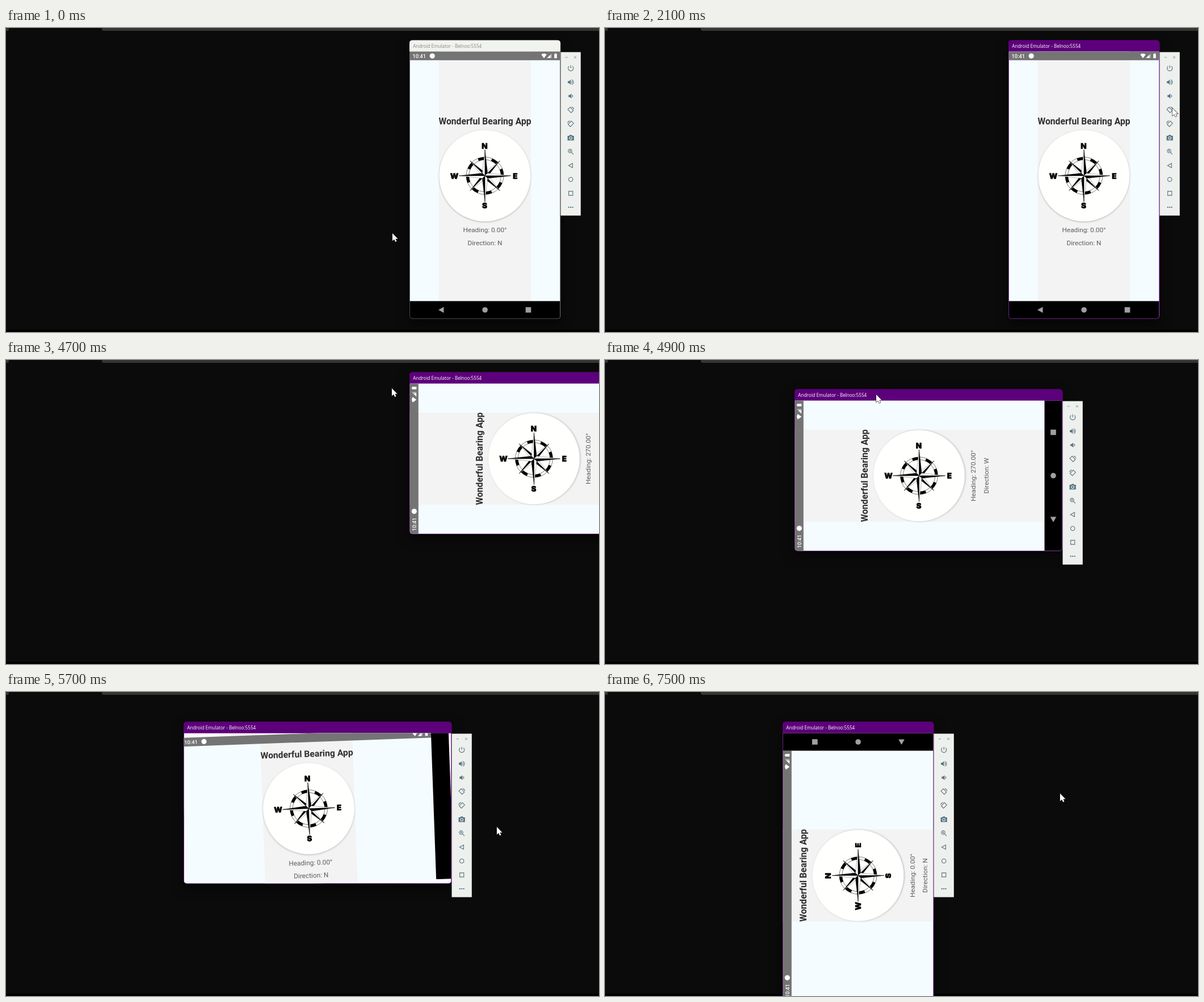
An HTML page for the animation above (8000 ms loop, 1045 by 536 pixels).

```html
<!DOCTYPE html>
<html lang="en">
<head>
<meta charset="utf-8">
<title>Compass in an emulator</title>
<style>
  html, body { margin: 0; width: 100%; height: 100%; overflow: hidden; background: #0b0b0b; }
  svg { display: block; }
  #app, #tall, #wide { font-family: Roboto, sans-serif; }
  #title { font: 8.1px "Open Sans", "Noto Sans", sans-serif; }
  .name { font-size: 15.7px; font-weight: 700; fill: #2f2f2f; text-anchor: middle; }
  .info { font-size: 11.8px; fill: #5c5c5c; text-anchor: middle; }
  .clock { font-size: 9.3px; font-weight: 500; fill: #fff; }
  .letters { font: 900 13.5px Inter, "Open Sans", sans-serif; text-anchor: middle; stroke: #000; stroke-width: .5; }
  .disc { filter: drop-shadow(0 1.5px 1.5px #0004); }
  #frame { filter: drop-shadow(0 8px 10px #0009); }
  #cursor { paint-order: stroke; }
  .line { fill: none; stroke: #557482; stroke-width: 1.1; }
  .solid { fill: #557482; }
</style>
</head>
<body>
<svg id="stage" width="1045" height="536" viewBox="0 0 1045 536">
  <rect width="1045" height="536" fill="#0b0b0b"/>
  <path d="M0 0H5V3Q5 5 3 5H0ZM169 0H1045V5H172Q169 5 169 2Z" fill="#343633"/>
  <rect y="532" width="1045" height="4" fill="#030102"/>
  <g id="win">
    <rect id="frame" x="-.5" rx="5.5"/>
    <path id="bar"/>
    <text id="title" x="5.8" y="13.2">Android Emulator - Belnoo:5554</text>
    <svg id="app" y="20">
      <clipPath id="round"><rect id="hole" y="-20" rx="5"/></clipPath>
      <g clip-path="url(#round)">
        <rect width="471" height="471" fill="#fefdfe"/>
        <g id="tall"></g>
        <g id="wide"></g>
      </g>
    </svg>
    <g id="tools"></g>
  </g>
  <path id="cursor" d="M0 0V13.3L3.1 10.6 5.2 15 7.4 14 5.4 9.7H9.4Z" fill="#fff" stroke="#222" stroke-width="1.2"/>
</svg>
<script>
const $ = id => document.getElementById(id);
const set = (id, attrs) => { for (const k in attrs) $(id).setAttribute(k, attrs[k]); };
const spin = (step, part) => [0, 1, 2, 3].map(i => `<g transform="rotate(${step + i * 90})">${part}</g>`).join('');

// One spike of the rose, half black and half white
const spike = (len, w) =>
  `<path d="M0 0L${-w} ${-w} 0 ${-len}Z" fill="#fff" stroke="#444" stroke-width=".4"/><path d="M0 0L${w} ${-w} 0 ${-len}Z" stroke="#000" stroke-width=".4"/>`;

const rose = `
  <circle r="33" fill="none" stroke="#222" stroke-width=".6"/>
  <circle r="28.3" fill="none" stroke="#222" stroke-width=".6"/>
  <circle r="30.6" fill="none" stroke="#000" stroke-width="5" pathLength="16" stroke-dasharray="1 1" stroke-dashoffset="1"/>
  ${spin(45, spike(37, 4))}${spin(0, spike(46, 4.6))}
  <g class="letters"><text x="-.5" y="-48">N</text><text x="-.5" y="57.5">S</text>
  <text x="-54" y="5">W</text><text x="53.5" y="5">E</text></g>`;

// A phone screen: page of w by h, dial centre at height cy, navigation bar outside the page
function screen(w, h, cy, nav, spots) {
  const cx = w / 2, [back, home, recent] = spots;
  return `<rect width="${w}" height="${h}" fill="#f4fcff"/>
    <rect x="${cx - 81.3}" width="162.6" height="${h}" fill="#f3f3f3"/>
    <rect width="${w}" height="15.3" fill="#747474"/>
    <text class="clock" x="5" y="11.3">10:41</text>
    <g fill="#fff"><circle cx="39.7" cy="7.8" r="4.6"/>
      <g transform="translate(${w},.3)">
        <path d="M-33.3 5Q-28.5 1.6-23.7 5L-28.5 11.5Z"/>
        <path d="M-23 11.3L-15 3.3V11.3Z" fill="#fff8"/><path d="M-23 11.3L-17.5 5.8V11.3Z"/>
        <path d="M-10.3 4H-9V3H-7V4H-5.7V11.5H-10.3Z"/></g></g>
    <text class="name" x="${cx}" y="${cy - 91}">Wonderful Bearing App</text>
    <g transform="translate(${cx},${cy})"><circle class="disc" r="80.5" fill="#fffffd"/><g class="dial">${rose}</g></g>
    <text class="info heading" x="${cx}" y="${cy + 99.7}">Heading: 0.00°</text>
    <text class="info direction" x="${cx}" y="${cy + 122.2}">Direction: N</text>
    <path d="${nav}"/>
    <g class="keys" fill="#a0a0a0"><path d="M-5 0L4.5-5.3V5.3Z" transform="translate(${back})"/>
      <circle r="4.8" transform="translate(${home})"/>
      <path d="M-4.8-4.8H4.8V4.8H-4.8Z" transform="translate(${recent})"/></g>`;
}
$('tall').innerHTML = screen(265, 440, 219, 'M0 440H265V471H0Z', ['55.5,455.5', '132.6,455.5', '209,455.5']);
$('wide').innerHTML = screen(440, 265, 132.5, 'M440 0H471V265H440Z', ['455.5,209', '455.5,132.6', '455.5,56.3']);

const line = d => `<path class="line" d="${d}"/>`, solid = d => `<path class="solid" d="${d}"/>`;
const turn = line('M-5.2-.9L-1-4.9 4.6.9.6 4.9ZM1.4-5.3Q4.8-4.6 5.4-1.2');
const icons = [
  line('M0-5.2V0M-3-3.5A4.6 4.6 0 1 0 3-3.5'),
  solid('M-5.2-1.7H-3L0-4.5V4.5L-3 1.7H-5.2Z') + line('M1.4-2A2.3 2.3 0 0 1 1.4 2M1.6-4.3A4.5 4.5 0 0 1 1.6 4.3'),
  solid('M-4-1.7H-1.8L1.2-4.3V4.3L-1.8 1.7H-4Z') + line('M2.4-2A2.3 2.3 0 0 1 2.4 2'),
  turn,
  `<g transform="scale(-1,1)">${turn}</g>`,
  solid('M-5.6-3.6H-2.7L-1.6-5H1.6L2.7-3.6H5.6V4.8H-5.6Z') +
    '<circle cy=".6" r="2.3" fill="#557482" stroke="#eef0ed" stroke-width="1.1"/>',
  line('M2-1.2A3.2 3.2 0 1 1-4.4-1.2A3.2 3.2 0 1 1 2-1.2M1.2 1.2L4.8 4.8M-2.8-1.2H.4M-1.2-2.8V.4'),
  line('M-3.8 0L3.2-3.8V3.8Z'),
  line('M3.7 0A3.7 3.7 0 1 1-3.7 0A3.7 3.7 0 1 1 3.7 0'),
  line('M-3.6-3.6H3.6V3.6H-3.6Z'),
  solid('M-4.4-1H-2.4V1H-4.4ZM-1-1H1V1H-1ZM2.4-1H4.4V1H2.4Z')
];
$('tools').innerHTML = `<rect y="21" width="35.3" height="288.2" fill="#eef0ed"/>
  <rect id="press" x="7.5" y="113.5" width="20" height="19" fill="#d3dade"/>
  <path d="M8.3 30.3H12.3M23.6 28.3L27.3 32M27.3 28.3L23.6 32" stroke="#777" stroke-width=".8"/>` +
  icons.map((icon, i) => `<g transform="translate(17.7,${49.5 + i * 24.5})">${icon}</g>`).join('');

// Rows of time, x, y
const pointer = [
  [100, 681, 362], [300, 634, 440], [500, 690, 501], [700, 840, 240], [800, 900, 52], [900, 938, 150],
  [1000, 845, 300], [1100, 832, 316], [1300, 960, 270], [1400, 1030, 210], [1600, 1000, 141.5],
  [3300, 1000, 141.5], [3800, 869, 19], [4000, 869, 19], [4300, 855, 31], [4500, 855, 31],
  [4600, 795, 40], [4700, 680, 50], [4900, 478, 61], [5300, 457, 62], [5400, 457, 62],
  [5700, 865, 238], [6000, 864, 238], [6300, 848, 224], [7200, 802, 179]
];
const place = [[4700, 711.5, 21.5], [4900, 334.5, 51.5], [5300, 313.5, 52.5]];

function at(keys, t) {
  const i = keys.findIndex(k => k[0] > t);
  if (i === 0) return keys[0].slice(1);
  if (i < 0) return keys[keys.length - 1].slice(1);
  const [a, b] = [keys[i - 1], keys[i]], u = (t - a[0]) / (b[0] - a[0]);
  return [a[1] + (b[1] - a[1]) * u, a[2] + (b[2] - a[2]) * u];
}

function draw(t) {
  const active = t >= 2100, flat = t >= 2700 && t < 7500, relaid = t >= 5500;
  const w = flat ? 471 : 265, h = flat ? 265 : 471;
  set('win', { transform: `translate(${at(place, t)})` });
  set('frame', { width: w + 1.5, height: h + 20.5, fill: active ? '#650a80' : '#3c3c3c' });
  set('bar', { d: `M-.5 20V5Q-.5 0 5 0H${w - 5}Q${w + .5} 0 ${w + .5} 5V20Z`, fill: active ? '#5d007b' : '#f1f3ee' });
  set('title', { fill: active ? '#fff' : '#858585' });
  set('app', { width: w, height: h });
  set('hole', { width: w, height: h + 20 });
  set('tools', { transform: `translate(${w + 1},0)` });
  set('press', { visibility: t >= 1900 && t < 2100 ? 'visible' : 'hidden' });

  // The new layout swings upright and settles, then its navigation keys appear
  const tilt = t < 6200 ? -90 * Math.exp((5500 - t) / 52.9) : 0;
  set('tall', { display: relaid ? 'none' : 'inline', transform: t < 2800 ? '' : 'translate(0,265) rotate(-90)' });
  set('wide', {
    display: relaid ? 'inline' : 'none',
    transform: t < 7500 ? `rotate(${tilt},235.5,132.5)` : 'translate(0,471) rotate(-90)'
  });
  $('wide').querySelector('.keys').setAttribute('opacity', tilt < -1 ? 0 : 1);
  const west = t >= 3000;
  const part = name => $('tall').querySelector(name);
  part('.dial').setAttribute('transform', `rotate(${west ? 90 : 0})`);
  part('.heading').textContent = `Heading: ${west ? '270.00' : '0.00'}°`;
  part('.direction').textContent = `Direction: ${west ? 'W' : 'N'}`;
  set('cursor', { transform: `translate(${at(pointer, t)})` });
}

const start = performance.now();
function tick() {
  draw(Math.floor((performance.now() - start) % 8000 / 100) * 100);
  requestAnimationFrame(tick);
}
tick();
</script>
</body>
</html>
```
